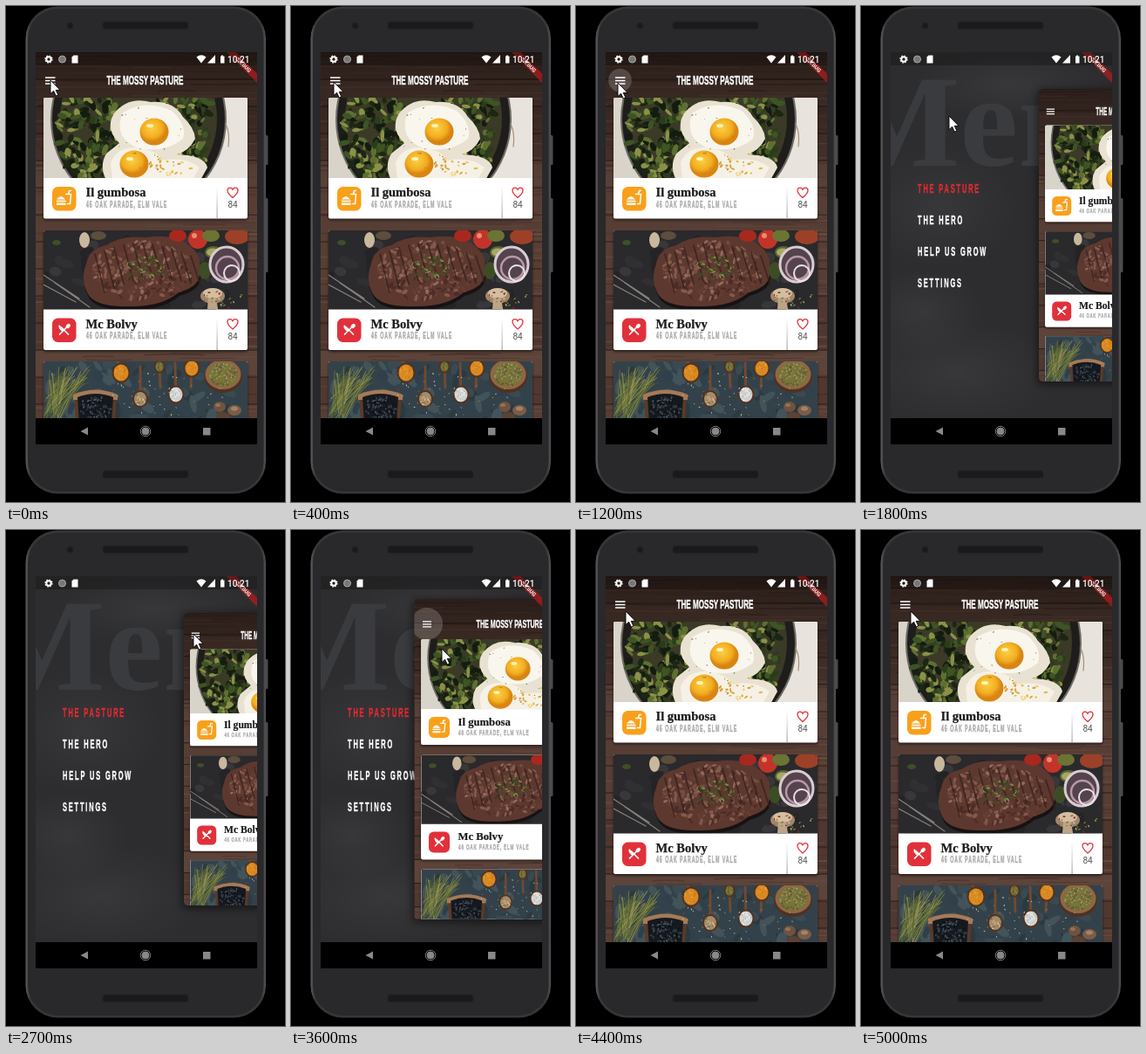
An HTML page that plays this animation: 320x568 px, repeating every 5.1 s.

```html
<!DOCTYPE html>
<html lang="en">
<head>
<meta charset="utf-8">
<title>Restaurant menu</title>
<style>
html, body { margin: 0; width: 100%; height: 100%; overflow: hidden; background: #000; }
svg { display: block; width: 100vw; height: 100vh; }
.caps { font: bold 15.3px "Liberation Sans", Arial, sans-serif; fill: #fff; stroke: #fff; stroke-width: .5px; }
.item { font-size: 14px; letter-spacing: 3.5px; }
.red { fill: #e02a33; stroke: #e02a33; }
.addr { font-size: 10px; letter-spacing: 1.74px; fill: #adadad; stroke: #adadad; }
.name { font: bold 14.5px "Liberation Serif", "Noto Serif", serif; fill: #1d1d1d; stroke: #1d1d1d; stroke-width: .25px; }
.count { font: 10px Roboto, sans-serif; fill: #555; text-anchor: middle; }
.clock { font: 500 10px Roboto, sans-serif; fill: #fff; }
.ghost { font: bold 150px "Liberation Serif", serif; fill: #393b3e; }
.debug { font: bold 6.2px Roboto, sans-serif; fill: #fff; text-anchor: middle; }
</style>
</head>
<body>
<svg viewBox="0 0 320 568" preserveAspectRatio="none">
  <defs>
    <linearGradient id="rim" x2="1" y2="0">
      <stop offset="0" stop-color="#5a5a5c"/><stop offset=".02" stop-color="#363638"/>
      <stop offset=".98" stop-color="#363638"/><stop offset="1" stop-color="#505052"/>
    </linearGradient>
    <linearGradient id="rule" x2="0" y2="1">
      <stop offset=".2" stop-color="#fff"/><stop offset="1" stop-color="#a5a5a5"/>
    </linearGradient>
    <linearGradient id="shade" x2="0" y2="1">
      <stop offset="0" stop-color="#000" stop-opacity=".45"/>
      <stop offset=".12" stop-color="#000" stop-opacity=".35"/>
      <stop offset=".4" stop-color="#000" stop-opacity="0"/>
    </linearGradient>
    <radialGradient id="yolk" cx=".42" cy=".36">
      <stop offset="0" stop-color="#fbd045"/><stop offset=".7" stop-color="#f2ad20"/>
      <stop offset="1" stop-color="#d98512"/>
    </radialGradient>
    <radialGradient id="haze">
      <stop offset="0" stop-color="#fff" stop-opacity=".05"/><stop offset="1" stop-color="#fff" stop-opacity="0"/>
    </radialGradient>
    <filter id="soft" x="-20%" y="-20%" width="140%" height="140%"><feGaussianBlur stdDeviation="5"/></filter>
    <filter id="drop" x="-10%" y="-10%" width="120%" height="120%"><feGaussianBlur stdDeviation="1.6"/></filter>
    <clipPath id="screen"><rect x="34" y="53" width="254" height="419"/></clipPath>
    <clipPath id="sheet"><rect id="corner" x="34" y="53" width="254" height="419"/></clipPath>
    <clipPath id="pic"><path d="M43 92V2q0-2 2-2H275q2 0 2 2V92Z"/></clipPath>
  </defs>

  <rect width="320" height="568"/>
  <g fill="#4a4a4c">
    <rect x="296" y="148" width="4.500" height="34" rx="1.500"/>
    <rect x="296" y="220" width="4.500" height="85" rx="1.500"/>
  </g>
  <rect x="22.500" y=".5" width="275.500" height="558" rx="37" fill="url(#rim)"/>
  <rect x="25" y="3" width="270.500" height="553" rx="35" fill="#29282b"/>
  <g fill="#1a1a1c" stroke="#222224">
    <rect x="111" y="18" width="98" height="8.500" rx="3"/>
    <rect x="111" y="532" width="98" height="8.500" rx="3"/>
    <circle cx="73.500" cy="22.500" r="3.500"/>
  </g>
  <rect x="34" y="53" width="254" height="449"/>

  <g clip-path="url(#screen)">
    <rect x="34" y="53" width="254" height="419" fill="#2d2d2f"/>
    <g fill="url(#haze)">
      <ellipse cx="110" cy="420" rx="120" ry="60"/><ellipse cx="70" cy="350" rx="70" ry="50"/>
      <ellipse cx="170" cy="90" rx="110" ry="40"/><ellipse cx="90" cy="230" rx="90" ry="70"/>
    </g>
    <text class="ghost" x="-28" y="183">Menu</text>
    <g id="items"></g>
    <rect id="shadow" x="31" y="53" width="260" height="424" rx="8" opacity=".45" filter="url(#soft)"/>
    <g id="page"><g clip-path="url(#sheet)">
      <g id="wood"></g>
      <rect x="34" y="53" width="254" height="419" fill="url(#shade)"/>
      <circle id="ripple" cx="50.500" cy="85" fill="#fff"/>
      <path d="M45 82H56.500M45 85.500H56.500M45 89H56.500" stroke="#fff" stroke-width="1.500"/>
      <g id="title"></g>
      <g id="cards"></g>
    </g></g>
    <g transform="translate(288 53) rotate(45)">
      <rect x="-26" y="17.300" width="52" height="7.400" fill="#b71c1c" opacity=".7"/>
      <text class="debug" y="23.200">DEBUG</text>
    </g>
    <rect x="34" y="53" width="254" height="15" fill="#000" opacity=".25"/>
    <g fill="#fff">
      <circle cx="49" cy="61" r="2.700" fill="none" stroke="#fff" stroke-width="2"/>
      <circle cx="49" cy="61" r="4" fill="none" stroke="#fff" stroke-width="1.300" stroke-dasharray="1.6 1.54"/>
      <circle cx="64.500" cy="61" r="4" fill="#777" stroke="#aaa"/>
      <path d="M77.500 56.500H82.500V65.500H75.500V58.500Z"/>
      <path d="M218.500 58.500Q224 54 229.500 58.500L224 65.500Z"/>
      <path d="M240 56V65.500H231Z"/>
      <path d="M246 57.500H247V56.500H249V57.500H250.500V65.500H246Z"/>
    </g>
    <text class="clock" x="254" y="64.700">10:21</text>
  </g>

  <path d="M94 482.500V491.500L85.500 487Z" fill="#888"/>
  <circle cx="160" cy="487" r="4" fill="#888" stroke="#888"/>
  <circle cx="160" cy="487" r="5.800" fill="none" stroke="#777"/>
  <rect x="226" y="483" width="8.500" height="8.500" fill="#888"/>
  <path id="cursor" d="M0 0V15.500L3.600 12.200L6.200 18L8.800 16.800L6.200 11.300H11Z" fill="#fff" stroke="#000" stroke-width=".9"/>
</svg>
<script>
const $ = id => document.getElementById(id);
let seed = 11;
const rnd = (a = 0, b = 1) => {
  seed = (seed * 16807) % 2147483647;
  return a + (b - a) * seed / 2147483647;
};
const pick = list => list[Math.floor(rnd(0, list.length))];
const times = (n, make) => Array.from({ length: n }, (_, i) => make(i)).join('');
const disc = (x, y, r, fill, ry = r, more = '') =>
  `<ellipse cx="${x}" cy="${y}" rx="${r}" ry="${ry}" fill="${fill}" ${more}/>`;
const path = (d, fill, more = '') => `<path d="${d}" fill="${fill}" ${more}/>`;
const line = (d, color, width, more = '') =>
  path(d, 'none', `stroke="${color}" stroke-width="${width}" stroke-linecap="round" ${more}`);
const caps = (x, y, text, cls = '', more = '') =>
  `<text class="caps ${cls}" transform="translate(${x} ${y}) scale(.53 1)" ${more}>${text}</text>`;

// Random ellipses inside an oval
const scatter = (n, cx, cy, rx, ry, size, colors) => times(n, () => {
  const a = rnd(0, 6.283), k = Math.sqrt(rnd());
  const x = cx + Math.cos(a) * rx * k, y = cy + Math.sin(a) * ry * k;
  return disc(x, y, size * rnd(.6, 1.3), pick(colors), size * rnd(.3, .7),
    `transform="rotate(${rnd(0, 180)} ${x} ${y})"`);
});

function wood() {
  const planks = times(14, i => `<rect x="34" y="${53 + i * 31}" width="254" height="31"
    fill="${pick(['#503830', '#573e35', '#5d443a'])}"/>`);
  const grain = times(260, () => {
    const x = rnd(0, 270), y = rnd(54, 472), w = rnd(30, 130);
    return line(`M${x} ${y}q${w / 2} ${rnd(-2, 2)} ${w} 0`, pick(['#3a2621', '#735548', '#452f28', '#654a3f']), rnd(.5, 1.6), 'opacity=".55"');
  });
  const gaps = times(14, i => line(`M34 ${53 + i * 31}H288`, '#2a1a17', 1));
  return planks + grain + gaps;
}

const greens = ['#1b2713', '#2b3c1a', '#3d5423', '#141c10', '#5d7030', '#8a9147'];

function eggs() {
  return '<rect x="43" width="234" height="92" fill="#d9d4ca"/>'
    + path('M225 0H277V92H210Z', '#e8e4dd')
    + disc(152, 25, 101, '#6d6a63', 106) + disc(152, 25, 99, '#1e1d1b', 104)
    + disc(152, 24, 90, '#3b3a27', 95)
    + scatter(190, 98, 42, 38, 55, 5.500, greens)
    + scatter(110, 203, 22, 36, 40, 5, greens)
    + scatter(60, 210, 70, 20, 24, 5, greens)
    + path('M124 18Q140 -2 166 5Q192 3 203 22Q216 34 217 47Q210 61 196 65Q228 66 231 80L222 96H116Q106 80 115 64L130 52Q113 36 124 18Z', '#e9e2d2')
    + path('M134 17Q160 1 190 15Q208 31 203 47Q184 63 152 58Q122 46 134 17Z', '#f9f6ee')
    + path('M120 75Q126 57 148 57Q174 60 180 72Q205 67 222 80L214 94H122Z', '#f6f1e6')
    + disc(170, 39, 16.500, 'url(#yolk)', 15.500) + disc(147, 76, 16.500, 'url(#yolk)', 15.500)
    + disc(165, 32, 4, '#fff3b8', 2) + disc(142, 70, 4, '#fff3b8', 2)
    + scatter(24, 188, 76, 32, 13, 2, ['#e8b83f', '#d9a441', '#f0d58a'])
    + scatter(24, 165, 45, 42, 44, .9, ['#7c5a2c', '#b0722a', '#556325'])
    + line('M252 30q5 10 3 26', '#a58f72', 1.200);
}

function steak() {
  const shape = 'M92 38Q95 21 115 17Q132 5 160 8Q194 3 210 17Q226 29 222 47Q224 64 198 71Q178 88 140 87Q101 88 93 71Q85 55 92 38Z';
  return '<rect x="43" width="234" height="92" fill="#2a292b"/>'
    + scatter(45, 160, 46, 118, 46, 9, ['#302f32', '#242326', '#38373a'])
    + path(shape, '#171213', 'transform="translate(1 4)"') + path(shape, '#5d382f')
    + `<g opacity=".8">${scatter(210, 157, 46, 57, 34, 3.200, ['#7b5145', '#8e6354', '#4a2a24', '#683f34', '#a1786a'])}</g>`
    + times(11, i => line(`M${102 + i * 11} ${27 - Math.sin(i / 3) * 12}l11 ${44 - i}`, '#35201d', 1.800, 'opacity=".75"'))
    + line('M139 55Q157 39 174 32M143 38Q158 50 181 50M158 39L151 27', '#415327', 1.100)
    + scatter(40, 160, 42, 23, 14, 1.900, ['#53682f', '#7c8d46', '#334621'])
    + line('M43 51L84 78M43 62L80 82M56 60L96 88', '#85807c', 1.200)
    + disc(90, 11, 6, '#c9b89d', 9) + disc(106, 6, 9, '#5c4d3d', 5) + disc(58, 14, 5, '#3f4f28', 3)
    + disc(197, 6, 10, '#a8281e', 7) + disc(220, 10, 11, '#c2342a', 11) + disc(216, 6, 3, '#ed8872')
    + disc(235, 6, 10, '#6b7433', 7) + disc(265, 7, 14, '#9c4127', 9) + disc(238, 25, 10, '#59682f', 7)
    + disc(237, 25, 7, '#a9a766', 4.500) + disc(228, 46, 7, '#3c4d25', 10)
    + disc(253, 39, 20, '#54434d', 21)
    + disc(253, 39, 19, 'none', 20, 'stroke="#d9cbd2" stroke-width="3"')
    + disc(254, 43, 13, 'none', 13, 'stroke="#b798a9" stroke-width="2.500"')
    + disc(259, 49, 9, 'none', 9, 'stroke="#ebe0e4" stroke-width="2"')
    + disc(237, 75, 14, '#a0866a', 9) + disc(237, 72, 11, '#d3bea0', 6) + path('M232 77h9l2 13h-12Z', '#bda486')
    + scatter(24, 250, 78, 25, 11, 1.400, ['#d4c4ae', '#8c2c20', '#6a7f39']);
}

function spices() {
  const spoon = (x, y, r, colors, hx, hy) => line(`M${x} ${y}L${hx} ${hy}`, '#74492f', 2.800)
    + disc(x, y, r + 2, '#53311f', r + 3) + disc(x, y, r, colors[0], r + 1)
    + scatter(26, x, y, r - 1, r, 1.200, colors);
  const amber = ['#d98a22', '#e9a136', '#c97a1c'], olive = ['#77743a', '#918b48', '#565a2b'];
  return '<rect x="43" width="234" height="92" fill="#33424a"/>'
    + scatter(60, 160, 38, 118, 45, 9, ['#3a4a52', '#2c393f', '#42535a', '#30404a'])
    + times(70, () => line(`M${rnd(43, 62)} ${rnd(42, 72)}L${rnd(50, 97)} ${rnd(5, 28)}`, pick(['#6b743a', '#9a9657', '#4a5c2e', '#83854a']), .800))
    + path('M78 40Q103 28 127 40L124 80H81Z', '#5a3a28') + path('M77 38Q103 27 128 38V44H77Z', '#a67a55')
    + path('M82 41Q103 33 123 41L121 70H84Z', '#15191f')
    + scatter(110, 103, 53, 18, 13, 1.700, ['#2f3943', '#0e1116', '#46525c'])
    + spoon(132, 13, 8.500, amber, 126, -8)
    + spoon(154, 43, 7, ['#a58c68', '#5a4632', '#d0bc94'], 154, 6)
    + spoon(176, 6, 4.500, olive, 177, 30)
    + spoon(195, 38, 7.500, ['#cfd2d0', '#f1f1ec', '#aeb5b5'], 194, 2)
    + spoon(213, 8, 7.500, amber, 212, 30)
    + disc(249, 17, 22, '#4d3223', 19) + disc(249, 15, 20.500, '#936544', 17) + disc(249, 15, 17, olive[0], 14)
    + scatter(100, 249, 15, 16, 13, 1.500, ['#8d8a54', '#5f5a31', '#a39a63', '#6c5a3a'])
    + scatter(40, 180, 38, 70, 25, .9, ['#a56833', '#c6b77f', '#d9dad4'])
    + disc(245, 52, 7, '#6f5240', 6) + disc(262, 56, 8, '#7d5c45', 6) + disc(249, 63, 8, '#5b4233', 5)
    + disc(262, 54, 4, '#a3826a', 2.500) + disc(243, 50, 3, '#93725b', 2);
}

const burger = line('M68.500 215.500h6l-1 11h-3M71.500 215l1-3.500h2', '#fff', 1.500)
  + path('M58 221.500q5-7 10 0ZM58 222.700h10.500v1.500H58ZM58 225.500h10.500v2.500H58Z', '#fff');
const cutlery = line('M61.500 376L70.500 367M63.500 368L71.500 376', '#fff', 1.700)
  + disc(71.300, 366.500, 3, '#fff', 2.100, 'transform="rotate(-45 71.300 366.500)"')
  + path('M61 365l6 6-2.300 2.300-2.700-2.700q-2.500-2.800-1-5.600Z', '#fff');

function card(y, picH, photo, name, color, icon) {
  const h = picH + 46.500, b = y + picH;
  const info = name ? `<rect x="53" y="${b + 10}" width="27.500" height="27.500" rx="6.500" fill="${color}"/>${icon}
    <text class="name" x="91.500" y="${b + 21}">${name}</text>
    ${caps(92, b + 33.500, '46 OAK PARADE, ELM VALE', 'addr')}
    <rect x="241.500" y="${b}" width="1.200" height="46.500" fill="url(#rule)"/>
    ${line(`M260 ${b + 22.500}q-6-5-6-8.300q0-3 3-3q2 0 3 2q1-2 3-2q3 0 3 3q0 3.300-6 8.300Z`, '#e0363c', 1.300)}
    <text class="count" x="260" y="${b + 34}">84</text>` : '';
  return `<rect x="43" y="${y + 2}" width="234" height="${h}" rx="2" opacity=".5" filter="url(#drop)"/>
    <rect x="43" y="${y}" width="234" height="${h}" rx="2" fill="#fff"/>
    <g transform="translate(0 ${y})" clip-path="url(#pic)">${photo}</g>
    <rect x="43" y="${b}" width="234" height="44" fill="#fff"/>${info}`;
}

$('wood').innerHTML = wood();
$('title').innerHTML = caps(159.500, 90, 'THE MOSSY PASTURE', '', 'text-anchor="middle"');
$('cards').innerHTML = card(105, 92, eggs(), 'Il gumbosa', '#f9a01b', burger)
  + card(257, 90.500, steak(), 'Mc Bolvy', '#e0313b', cutlery)
  + card(407, 92, spices());
$('items').innerHTML = ['THE PASTURE', 'THE HERO', 'HELP US GROW', 'SETTINGS'].map((label, i) =>
  `<g>${caps(65, 214 + i * 36, label, i ? 'item' : 'item red')}</g>`).join('');

const LOOP = 5100, STEP = 100, OPEN = 1200, CLOSE = 3463, SLIDE = 250;
const clamp = v => Math.min(1, Math.max(0, v));

// cubic-bezier(0, 0, .58, 1)
function easeOut(p) {
  let lo = 0, hi = 1;
  for (let i = 0; i < 24; i++) {
    const s = (lo + hi) / 2;
    if (1.74 * (1 - s) * s * s + s * s * s < p) lo = s; else hi = s;
  }
  return 3 * (1 - lo) * lo * lo + lo * lo * lo;
}

const track = [
  [0, 51, 85], [200, 51, 85], [500, 48, 88], [1300, 48, 88], [1700, 101, 126], [2100, 101, 126],
  [2500, 150, 140], [2700, 215, 119], [3450, 215, 119], [3600, 173, 136], [3900, 90, 108],
  [4200, 57, 93], [LOOP, 57, 93]
];
function pointer(t) {
  const i = track.findIndex(k => k[0] > t);
  const [t0, x0, y0] = track[i - 1], [t1, x1, y1] = track[i];
  const k = (t - t0) / (t1 - t0);
  return [x0 + (x1 - x0) * k, y0 + (y1 - y0) * k];
}

function draw(t) {
  const open = easeOut(clamp((t - OPEN) / SLIDE) - clamp((t - CLOSE) / SLIDE));
  const scale = 1 - .2 * open;
  const move = `translate(${34 + 170 * open} 262.500) scale(${scale}) translate(-34 -262.500)`;
  $('page').setAttribute('transform', move);
  $('shadow').setAttribute('transform', move);
  $('corner').setAttribute('rx', 6.200 * open);

  [...$('items').children].forEach((item, i) => {
    const k = easeOut(clamp((t - OPEN - 75 * i) / 300));
    item.setAttribute('transform', `translate(0 ${120 * (1 - k)})`);
    item.setAttribute('opacity', k);
  });

  const age = t - (t < 2500 ? OPEN : CLOSE) + 100;
  const live = age > 0 && age < 500;
  $('ripple').setAttribute('r', live ? 21 * easeOut(clamp(age / 220)) : 0);
  $('ripple').setAttribute('opacity', .18 * clamp((500 - age) / 250));
  $('cursor').setAttribute('transform', `translate(${pointer(t)})`);
}

const start = performance.now();
let last = -1;
function tick() {
  const t = Math.floor((performance.now() - start) % LOOP / STEP) * STEP;
  if (t !== last) draw(last = t);
  requestAnimationFrame(tick);
}
tick();
</script>
</body>
</html>
```
